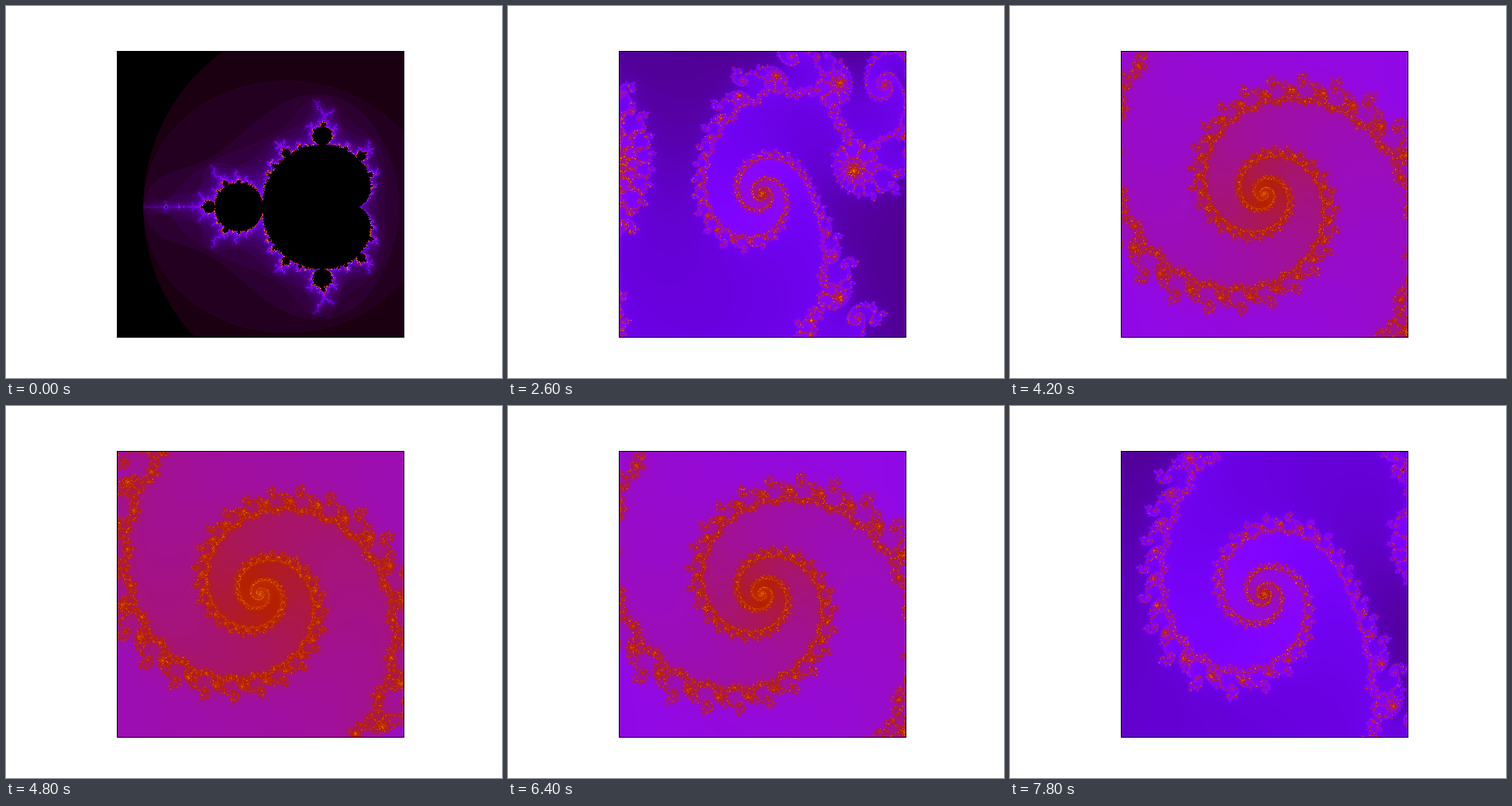
Animation of 640x480 px, one loop 8000 ms. Source, as an HTML page with a canvas:

```html
<!DOCTYPE html>
<html lang="en">
<head>
<meta charset="utf-8">
<title>Fractal zoom</title>
<style>
html, body { margin: 0; width: 100%; height: 100%; overflow: hidden; background: #fff; }
canvas { display: block; width: 640px; height: 480px; }
</style>
</head>
<body>
<canvas id="stage" width="640" height="480"></canvas>
<script>
const ctx = document.getElementById('stage').getContext('2d');
const LEFT = 143, TOP = 58, W = 371, H = 370;
const MID_X = 328, MID_Y = 242.4, UNIT = 123.2;
const STEP = 200, LOOP = 8000, PEAK = 26, HOTTEST = 0.85;
const cache = new Map();

// Refine the spiral's centre: the 24th orbit point is the fixed point,
// so z = z23 satisfies z² + z + c = 0.
function spiralCentre() {
  let a = -0.77568377, b = 0.13646737;
  for (let pass = 0; pass < 6; pass++) {
    let x = 0, y = 0, dx = 0, dy = 0;
    for (let k = 0; k < 23; k++) {
      [dx, dy] = [2 * (x * dx - y * dy) + 1, 2 * (x * dy + y * dx)];
      [x, y] = [x * x - y * y + a, 2 * x * y + b];
    }
    const gx = x * x - y * y + x + a, gy = 2 * x * y + y + b;
    const px = 2 * x + 1, py = 2 * y;
    const hx = px * dx - py * dy + 1, hy = px * dy + py * dx;
    const q = hx * hx + hy * hy;
    a -= (gx * hx + gy * hy) / q;
    b -= (gy * hx - gx * hy) / q;
  }
  return [a, b];
}
const [CX, CY] = spiralCentre();

function insideMainBodies(a, b) {
  const b2 = b * b, s = a - 0.25, q = s * s + b2;
  return q * (q + s) < b2 / 4 || (a + 1) * (a + 1) + b2 < 0.0625;
}

// Steps until escape, 0 when the point never leaves.
function escapeCount(a, b, limit) {
  if (insideMainBodies(a, b)) return 0;
  let x = 0, y = 0, xx = 0, yy = 0;
  for (let n = 0; n < limit; n++) {
    y = 2 * x * y + b;
    x = xx - yy + a;
    xx = x * x;
    yy = y * y;
    if (xx + yy > 4) return n;
  }
  return 0;
}

// Count at the top of the colour scale: it grows with the zoom, drops
// once the black bodies leave the view, then grows along the spiral.
function scaleTop(level) {
  return level < 9
    ? 100 + 50 * level
    : Math.max(265 + 21 * (level - 13), 500 - 100 * (level - 8));
}

function render(level) {
  if (cache.has(level)) return cache.get(level);
  const img = ctx.createImageData(W, H), px = img.data;
  const scale = UNIT * 10 ** (level / 4);
  const top = scaleTop(level), limit = level < 9 ? top : 2 * top;
  const tint = Array.from({ length: Math.ceil(limit) + 1 }, (_, n) => {
    const v = Math.min(HOTTEST, n / top);
    return [255 * Math.sqrt(v), 255 * v ** 3, 255 * Math.sin(2 * Math.PI * v)];
  });
  let p = 0;
  for (let j = 0; j < H; j++) {
    const b = CY + (MID_Y - TOP - j - 0.5) / scale;
    for (let i = 0; i < W; i++) {
      const a = CX + (LEFT + i + 0.5 - MID_X) / scale;
      const rgb = tint[escapeCount(a, b, limit)];
      px[p++] = rgb[0];
      px[p++] = rgb[1];
      px[p++] = rgb[2];
      px[p++] = 255;
    }
  }
  cache.set(level, img);
  return img;
}

// In to the peak, a short hold, then back out; the start also holds one step.
function levelAt(tick) {
  if (tick < 2) return 0;
  return tick <= PEAK ? tick : 2 * PEAK + 1 - tick;
}

let shown = -1;
function draw(time) {
  const tick = Math.floor((time % LOOP) / STEP);
  const level = levelAt(tick);
  if (level !== shown) {
    ctx.fillStyle = '#fff';
    ctx.fillRect(0, 0, 640, 480);
    ctx.putImageData(render(level), LEFT, TOP);
    ctx.strokeStyle = '#000';
    ctx.lineWidth = 1;
    ctx.strokeRect(LEFT + 0.5, TOP + 0.5, W - 1, H - 1);
    shown = level;
  } else {
    // Prepare the next picture while this one stands.
    let next = tick + 1;
    while (next < LOOP / STEP && levelAt(next) === level) next++;
    if (next < LOOP / STEP) render(levelAt(next));
  }
}

const start = performance.now();
function loop() {
  draw(performance.now() - start);
  requestAnimationFrame(loop);
}
loop();
</script>
</body>
</html>
```
